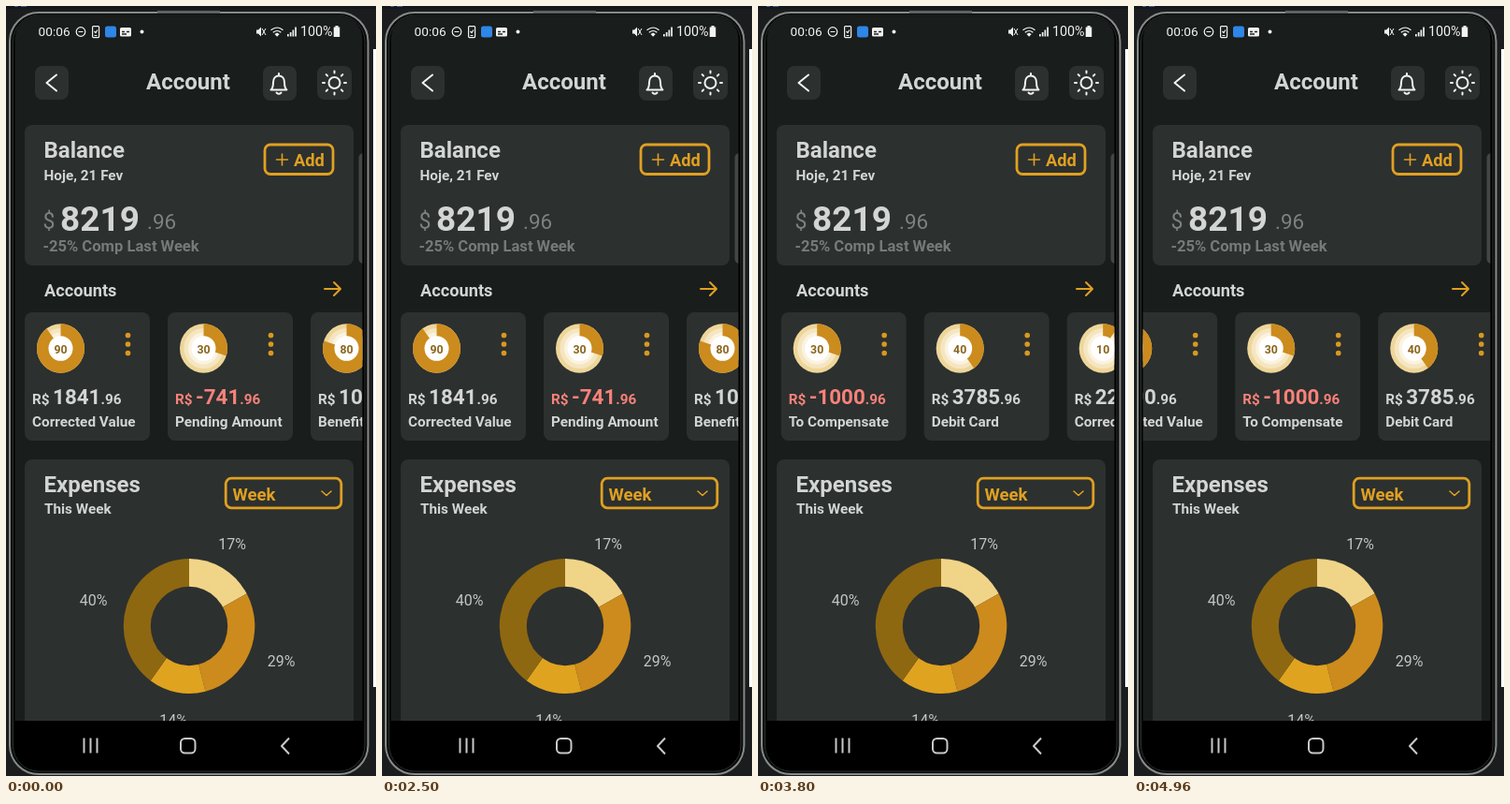
An HTML page that plays this animation: 396x822 px, repeating every 5 s.

```html
<!DOCTYPE html>
<html lang="en">
<head>
<meta charset="utf-8">
<title>Account</title>
<style>
html, body { margin: 0; width: 100%; height: 100%; overflow: hidden; background: #1b1c1d; }
svg { display: block; width: 396px; height: 822px; font-family: Roboto, sans-serif; }
.bold { font-weight: 700; fill: #d3d5d4; }
.h { font-size: 24px; }
.sub { font-size: 15.3px; }
.panel { fill: #2c302f; }
.line { fill: none; stroke: #f2f2f2; stroke-width: 2; stroke-linecap: round; stroke-linejoin: round; }
.line.amber { stroke: #e0a021; }
.bold.amber { fill: #e0a021; }
.line.thin { stroke-width: 1.6; }
.line.box { stroke-width: 2.8; }
.pct { font-size: 16px; fill: #c3c6c5; text-anchor: middle; }
</style>
</head>
<body>
<svg viewBox="0 0 396 822">
  <defs>
    <clipPath id="screen"><rect x="9.5" y="11" width="372" height="805" rx="24"/></clipPath>
    <clipPath id="page"><rect x="9.5" y="11" width="372" height="752"/></clipPath>
  </defs>

  <!-- phone body -->
  <rect width="396" height="3" fill="#15161b"/>
  <path d="M9 0h4M16 0h6" stroke="#39618f" stroke-width="2"/>
  <rect x="393" y="46" width="3" height="681" fill="#fff"/>
  <rect x="4" y="7" width="383.5" height="813" rx="31" fill="#0a0b0b" stroke="#858b89" stroke-width="2"/>
  <rect x="7.5" y="10" width="376.5" height="807" rx="28" fill="#000" stroke="#2c302f"/>
  <path d="M162 6.5h67" stroke="#606363" stroke-width="3"/>

  <g clip-path="url(#screen)">
    <rect x="9" y="10" width="374" height="754" fill="#191d1c"/>

    <!-- status bar -->
    <g fill="#f2f2f2">
      <text x="34.5" y="32" font-size="13.7">00:06</text>
      <g fill="none" stroke="#f2f2f2" stroke-width="1.2">
        <circle cx="80" cy="27.5" r="4.8"/><path d="M77.5 27.5h5"/>
        <rect x="92.6" y="21.6" width="7" height="12" rx="1"/><path d="M94.5 27l1.5 1.5 2-3M94.5 31.5h3"/>
        <path d="M274 24l4 7M278 24l-4 7" stroke-width="1"/>
        <path d="M283.5 25.8q7-5.6 13 0M285.8 28.3q4.5-3.6 8.6 0"/>
      </g>
      <rect x="106" y="21.5" width="12" height="12" rx="2.5" fill="#2e86e6"/>
      <rect x="122" y="23" width="12" height="9.5" rx="1.5"/>
      <path d="M124 27.5h3m2 0h3M124 30h5" stroke="#222" stroke-width="1.3"/>
      <circle cx="145.5" cy="27.5" r="2"/>
      <path d="M268 25.5h2l3-3v10l-3-3h-2z"/>
      <path d="M287.5 30l2.6-1.5 2.6 1.5-2.6 2.8z"/>
      <path d="M301 30h1.7v2.5h-1.7zM303.8 28h1.7v4.5h-1.7zM306.5 25.5h1.7v7h-1.7zM309.2 22.5h1.7v10h-1.7z"/>
      <text x="315" y="32" font-size="14.3">100%</text>
      <path d="M352.5 22.5v-1.5h3v1.5h1.7v10.5h-6.5v-10.5z"/>
    </g>

    <!-- header -->
    <g class="panel">
      <rect x="31" y="64" width="36" height="36" rx="8"/>
      <rect x="275" y="64" width="36" height="37" rx="8"/>
      <rect x="333" y="64" width="37" height="36" rx="8"/>
    </g>
    <path class="line" d="M54 73.5l-10.5 8.500 10.5 8.500"/>
    <text class="bold h" x="150" y="89">Account</text>
    <path class="line" d="M283.5 89.5q2.5-2 2.5-8c0-4 2.5-7 6-7s6 3 6 7q0 6 2.5 8zM292 74v-2M289.5 92.5q2.5 2.5 5 0"/>
    <circle class="line" cx="351.5" cy="82" r="6"/>
    <g id="rays" class="line"></g>

    <g clip-path="url(#page)">
      <!-- balance -->
      <rect class="panel" x="20" y="127" width="352" height="150" rx="8"/>
      <rect x="377.5" y="157" width="12" height="118" rx="5" fill="#424746"/>
      <text class="bold h" x="40.5" y="162">Balance</text>
      <text class="bold sub" x="40.5" y="186">Hoje, 21 Fev</text>
      <text x="39.5" y="238" font-size="23" fill="#7d8180">$</text>
      <text class="bold" x="58" y="239.7" font-size="37">8219</text>
      <text x="151" y="238" font-size="22.5" fill="#7d8180">.96</text>
      <text x="39.5" y="262" font-size="16.6" font-weight="700" fill="#767a79">-25% Comp Last Week</text>
      <rect class="line amber box" x="277" y="148" width="73" height="31.5" rx="6"/>
      <path class="line amber thin" d="M289.5 164h12M295.5 158v12"/>
      <text class="bold amber" x="308" y="171" font-size="18.3">Add</text>

      <!-- accounts -->
      <text class="bold" x="41" y="310" font-size="18.2">Accounts</text>
      <path class="line amber" d="M341 302h16.5M351 295l7 7-7 7"/>
      <g id="cards"></g>

      <!-- expenses -->
      <rect class="panel" x="20" y="484" width="352" height="300" rx="8"/>
      <text class="bold h" x="40.5" y="519">Expenses</text>
      <text class="bold sub" x="41" y="542">This Week</text>
      <rect class="line amber box" x="235.2" y="504.2" width="123.6" height="31.6" rx="6"/>
      <text class="bold amber" x="242.5" y="528" font-size="18.6">Week</text>
      <path class="line amber thin" d="M338 518l5 4.5 5-4.5"/>
      <g id="donut"></g>
      <text class="pct" x="242" y="580">17%</text>
      <text class="pct" x="294.5" y="705">29%</text>
      <text class="pct" x="179" y="768">14%</text>
      <text class="pct" x="93.5" y="640">40%</text>
    </g>

    <g id="toast" opacity="0">
      <rect x="116.5" y="649.5" width="155" height="47" rx="22" fill="#333433"/>
      <rect x="134" y="661" width="23" height="23" rx="8" fill="#f6f6f6"/>
      <text x="165" y="679" font-size="16.5" fill="#ececec">Refreshing...</text>
    </g>

    <!-- navigation -->
    <rect x="9" y="763" width="374" height="55" fill="#000"/>
    <g class="line" style="stroke:#c9c9c9;stroke-linecap:butt">
      <path d="M83.5 781.5v16M90.5 781.5v16M97.5 781.5v16"/>
      <rect x="187" y="782" width="15.5" height="15.5" rx="4.5"/>
      <path d="M303 781.5l-8 8.5 8 8.5"/>
    </g>
  </g>
</svg>
<script>
const $ = id => document.getElementById(id);
const LOOP = 5000;
const PITCH = 153;
const TALL = 1.025; // charts are slightly taller than wide

const accounts = [
  [90, '1841', 'Corrected Value'],
  [30, '-741', 'Pending Amount'],
  [80, '1001', 'Benefits'],
  [50, '490', 'Corrected Value'],
  [30, '-1000', 'To Compensate'],
  [40, '3785', 'Debit Card'],
  [10, '2200', 'Corrected Value'],
  [80, '-1741', 'Corrected Value']
];

// Time in ms, scroll offset in px
const scrollKeys = [
  [2880, 0], [3000, 70], [3210, 313], [3480, 520], [3800, 607],
  [4250, 777], [4480, 840], [4620, 810], [4960, 524.5], [5000, 500]
];

// Time in ms, opacity
const toastKeys = [[250, 0], [600, 1], [2130, 1], [2490, 0]];

// Pie slice between two fractions of a turn, clockwise from the top
function slice(cx, cy, r, from, to, fill) {
  const at = f => {
    const a = f * 2 * Math.PI;
    return `${cx + r * Math.sin(a)} ${cy - r * TALL * Math.cos(a)}`;
  };
  const large = to - from > 0.5 ? 1 : 0;
  return `<path d="M${cx} ${cy}L${at(from)}A${r} ${r * TALL} 0 ${large} 1 ${at(to)}Z" fill="${fill}"/>`;
}

const disc = (x, y, r, fill) =>
  `<ellipse cx="${x}" cy="${y}" rx="${r}" ry="${r * TALL}" fill="${fill}"/>`;

function card([percent, value, label], i) {
  const tint = value[0] === '-' ? 'style="fill:#f8827a"' : '';
  return `<g transform="translate(${20 + i * PITCH} 0)">
    <rect class="panel" y="327" width="134" height="137" rx="8"/>
    ${disc(38.5, 365.5, 25.5, '#eed69a')}
    ${disc(38.5, 365.5, 21, '#f5e6c2')}
    ${disc(38.5, 365.5, 16.5, '#fbf3e0')}
    ${slice(38.5, 365.5, 25.5, 0, percent / 100, '#cc8b1d')}
    ${disc(38.5, 365.5, 13, '#fff')}
    <text x="38.5" y="370.5" font-size="12.3" font-weight="700" fill="#8b661b" text-anchor="middle">${percent}</text>
    ${[351.5, 361, 370.5].map(y => disc(110.5, y, 2.8, '#d9981f')).join('')}
    <text class="bold sub" x="8" y="424.7" ${tint}>R$<tspan dx="3.5" font-size="22.4">${value}</tspan><tspan>.96</tspan></text>
    <text class="bold sub" x="8" y="449.3">${label}</text>
  </g>`;
}

function donut() {
  const parts = [[17, '#f0d488'], [29, '#cc8b1c'], [14, '#e0a31f'], [40, '#8e6711']];
  let sum = 0;
  return parts.map(([n, fill]) => {
    const from = sum / 100;
    sum += n;
    return slice(196, 662, 70.3, from, sum / 100, fill);
  }).join('') + disc(196, 662, 41.2, '#2c302f');
}

// Monotone cubic curve through the keys, held at both ends
function curve(keys) {
  const n = keys.length - 1;
  const rate = i => (keys[i + 1][1] - keys[i][1]) / (keys[i + 1][0] - keys[i][0]);
  const slopes = keys.map((_, i) => {
    if (i === 0 || i === n) return 0;
    const a = rate(i - 1), b = rate(i);
    return a * b > 0 ? 2 * a * b / (a + b) : 0;
  });
  return t => {
    if (t <= keys[0][0]) return keys[0][1];
    if (t >= keys[n][0]) return keys[n][1];
    const i = keys.findIndex(k => k[0] > t) - 1;
    const [t0, v0] = keys[i], [t1, v1] = keys[i + 1];
    const d = t1 - t0, u = (t - t0) / d, w = 1 - u;
    return v0 * (1 + 2 * u) * w * w + v1 * u * u * (3 - 2 * u)
      + d * u * w * (slopes[i] * w - slopes[i + 1] * u);
  };
}

$('rays').innerHTML = Array.from({ length: 8 }, (_, i) =>
  `<path d="M351.5 71.5v-2" transform="rotate(${i * 45} 351.5 82)"/>`).join('');
$('cards').innerHTML = accounts.map(card).join('');
$('donut').innerHTML = donut();

const scrollAt = curve(scrollKeys);
const toastAt = curve(toastKeys);
const start = performance.now();

function draw() {
  const t = (performance.now() - start) % LOOP;
  $('cards').setAttribute('transform', `translate(${-scrollAt(t)} 0)`);
  $('toast').setAttribute('opacity', toastAt(t));
  requestAnimationFrame(draw);
}
draw();
</script>
</body>
</html>
```
